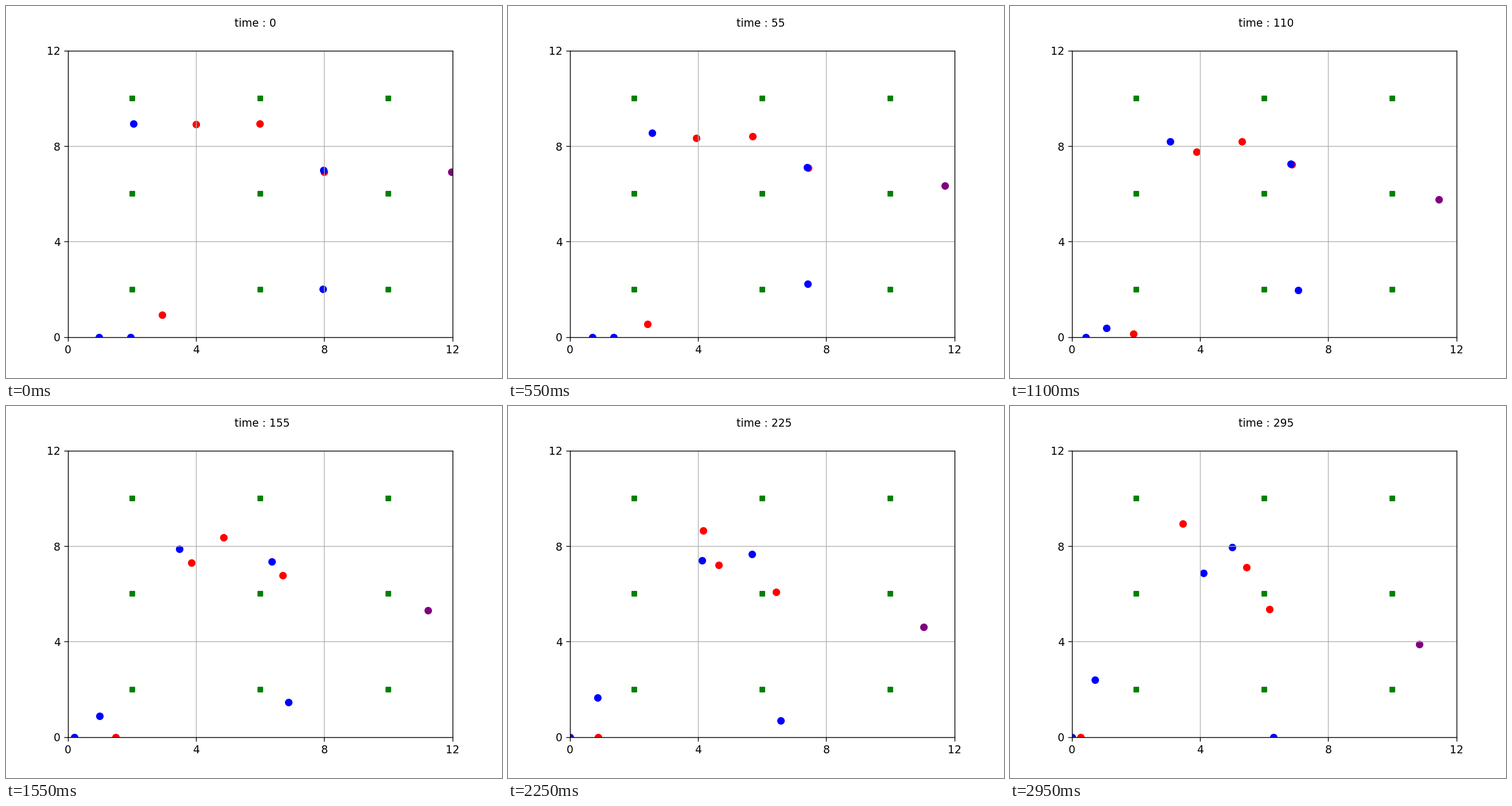
Recreate the animation shown at these times as a matplotlib script. Size 864 by 648 pixels, loop 3 s.

```python
import numpy as np
import matplotlib.pyplot as plt
from matplotlib.animation import FuncAnimation

FRAMES, INTERVAL, TIME_STEP = 60, 50, 5
LINE = 0.72

plt.rcParams.update({
    "axes.linewidth": LINE, "grid.linewidth": LINE,
    "xtick.major.width": LINE, "ytick.major.width": LINE,
})

# A walker goes straight from start to a turn, then straight to its end:
# (start, turn, end, step of the turn). The floor and left wall stop it.
WALKERS = {
    "red": [
        ((4.0, 8.91), (3.85, 7.3), (5.45, 7.11), 31),
        ((5.98, 8.94), (5.53, 8.1), (3.45, 8.94), 17.5),
        ((7.99, 6.93), (6.87, 7.24), (6.17, 5.36), 22),
        ((2.94, 0.94), (1.49, -0.2), (0.26, -0.2), 31),
    ],
    "blue": [
        ((2.05, 8.93), (4.4, 7.2), (4.11, 6.88), 51),
        ((7.97, 6.99), (6.36, 7.36), (5.0, 7.95), 31),
        ((7.95, 2.01), (7.2, 2.31), (6.29, -0.07), 15.6),
        ((0.97, 0), (0, 0), (0, 0), 39),
        ((1.96, 0), (1.15, 0), (0.72, 2.41), 15.1),
    ],
    "purple": [((11.97, 6.91), (11.23, 5.31), (10.85, 3.9), 31)],
}


def position(start, turn, end, turn_step, step):
    times = (0, turn_step, FRAMES - 1)
    return [max(0, np.interp(step, times, axis))
            for axis in zip(start, turn, end)]


def positions(walkers, step):
    return np.array([position(*w, step) for w in walkers])


fig, ax = plt.subplots(figsize=(6.4, 4.8), dpi=135)
ax.set(xlim=(0, 12), ylim=(0, 12),
       xticks=range(0, 13, 4), yticks=range(0, 13, 4))
ax.grid(True)

gx, gy = np.meshgrid(range(2, 12, 4), range(2, 12, 4))
ax.scatter(gx, gy, s=20, marker="s", color="green")

groups = [(walkers, ax.scatter(*positions(walkers, 0).T, color=color))
          for color, walkers in WALKERS.items()]
clock = ax.text(5.2, 13, "time : 0")


def update(i):
    for walkers, dots in groups:
        dots.set_offsets(positions(walkers, i))
    clock.set_text(f"time : {i * TIME_STEP}")
    return [dots for _, dots in groups] + [clock]


anim = FuncAnimation(fig, update, frames=FRAMES, interval=INTERVAL,
                     repeat=True, repeat_delay=0)
plt.show()
```
